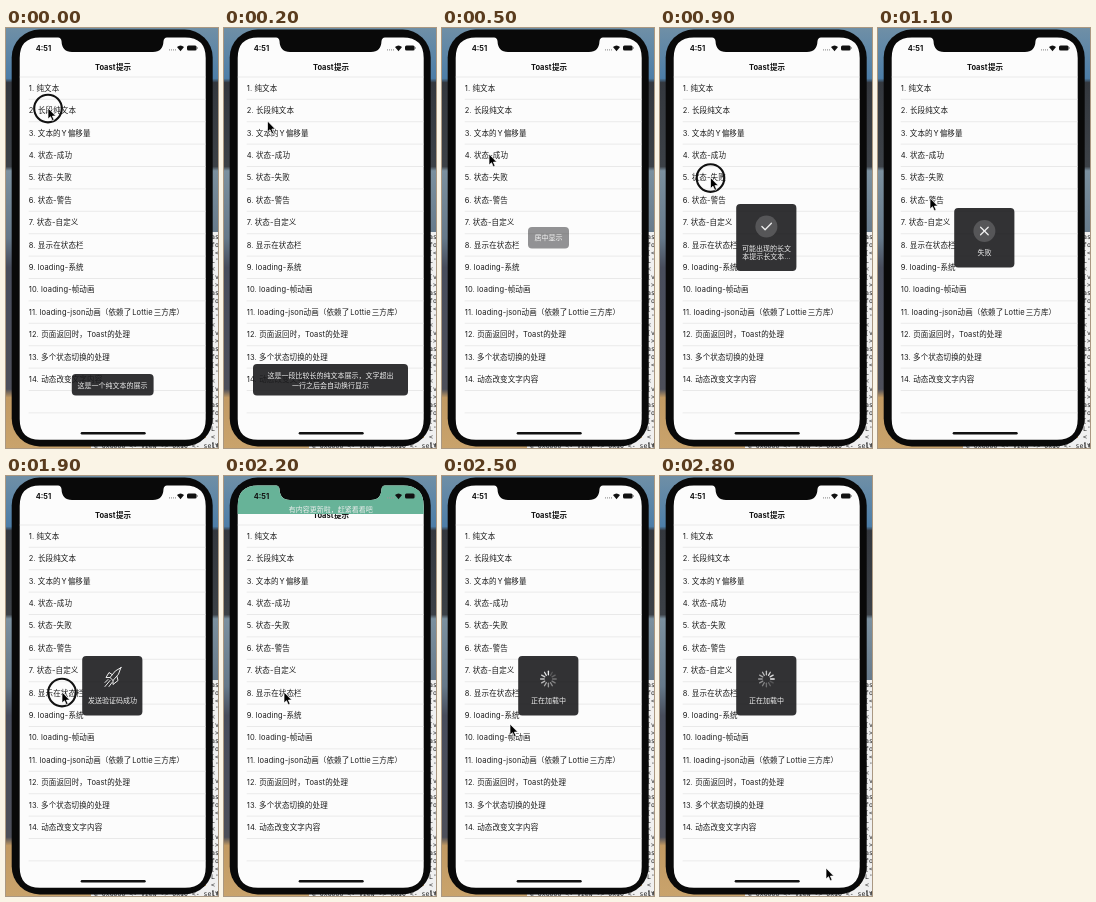
Write an HTML page that moves like this. It is 212 px wide and 420 px high and loops after 2900 ms.

```html
<!DOCTYPE html>
<html lang="zh">
<head>
<meta charset="utf-8">
<style>
html, body { margin: 0; width: 100%; height: 100%; overflow: hidden; background: #101010; }
svg { display: block; width: 212px; height: 420px; font: 7.5px Inter, "Noto Sans CJK SC", "Noto Sans CJK", sans-serif; }
.list text { letter-spacing: .14px; fill: #1c1c1c; }
.bold { font-size: 7.5px; font-weight: 700; fill: #111; }
.toast text { font-size: 7px; fill: #eee; text-anchor: middle; }
.term text { font: 6.5px "DejaVu Sans Mono", monospace; fill: #222; }
.icon { fill: none; stroke: #eee; stroke-width: 1.3; stroke-linecap: round; stroke-linejoin: round; }
</style>
</head>
<body>
<svg viewBox="0 0 212 420">
  <defs>
    <linearGradient id="wall" x2="0" y2="1">
      <stop offset="0" stop-color="#6f8fa6"/><stop offset=".12" stop-color="#4d7ea8"/>
      <stop offset=".13" stop-color="#34383e"/><stop offset=".33" stop-color="#3c4147"/>
      <stop offset=".34" stop-color="#7b909f"/><stop offset=".5" stop-color="#66798a"/>
      <stop offset=".57" stop-color="#484d5c"/><stop offset=".86" stop-color="#4d4f5a"/>
      <stop offset=".88" stop-color="#c29a63"/><stop offset="1" stop-color="#c9a36c"/>
    </linearGradient>
    <clipPath id="screen"><path d="M34 9.5H52Q55 9.5 55.5 13Q56 24 66 24H147Q157 24 157.5 13Q158 9.5 161 9.5H179Q199.7 9.5 199.7 30V391Q199.7 411.7 179 411.7H34Q13.7 411.7 13.7 391V30Q13.7 9.5 34 9.5Z"/></clipPath>
  </defs>
  <rect width="212" height="420" fill="url(#wall)"/>
  <g class="term" id="term">
    <path d="M200 204H212V420H85V410H200Z" fill="#f0f0f0"/>
  </g>
  <rect x="5.7" y="1.5" width="201" height="417" rx="28" fill="#090909"/>
  <g clip-path="url(#screen)">
    <rect width="212" height="420" fill="#fcfcfc"/>
    <path id="lines" stroke="#dedede" stroke-width=".6"/>
    <text class="bold" x="107" y="41.8" text-anchor="middle">Toast&#x200a;提示</text>
    <g class="list" id="list"></g>
    <rect x="74.7" y="404" width="65" height="2.4" rx="1.2" fill="#111"/>
    <g class="toast" id="banner">
      <rect x="13" width="187" height="38" fill="#67b398"/>
      <text x="106.7" y="36.3">有内容更新啦，赶紧看看吧</text>
    </g>
    <text class="bold" x="29.7" y="22.8">4:51</text>
    <path d="M163 21.8h1m1 0h1m1 0h1m1 0h1" stroke="#999" stroke-width="1.2"/>
    <path d="M171 19Q174.5 15.8 178 19L174.5 23.2Z" fill="#111"/>
    <rect x="181" y="17.4" width="9.6" height="5.2" rx="1.5" fill="#111"/>
    <path d="M191.4 19v2" stroke="#888" stroke-width=".8"/>
  </g>
  <g class="toast" id="toast"></g>
  <g id="pointer">
    <circle id="ring" cy=".6" r="13.8" fill="none" stroke="#111" stroke-width="2.1"/>
    <path d="M0 0V11L2.5 8.7L4.3 12.8L6.1 12L4.4 8.1H7.8Z" fill="#000" stroke="#fff" stroke-width=".7"/>
  </g>
</svg>
<script>
const $ = id => document.getElementById(id);
const STEP = 100, LOOP = 2900;

const rows = ['纯文本', '长段纯文本', '文本的\u200aY\u200a偏移量', '状态-成功', '状态-失败', '状态-警告', '状态-自定义',
  '显示在状态栏', 'loading-系统', 'loading-帧动画', 'loading-json动画（依赖了\u200aLottie\u200a三方库）',
  '页面返回时，Toast的处理', '多个状态切换的处理', '动态改变文字内容'];
$('list').innerHTML = rows.map((row, i) =>
  `<text x="22.7" y="${62.8 + 22.4 * i}">${i + 1}. ${row}</text>`).join('');
$('lines').setAttribute('d', 'M13 49H200' +
  Array.from({ length: 15 }, (_, i) => `M22.7 ${71.3 + 22.4 * i}H200`).join(''));
const words = ['as', 'fo', '[&lt;', 'L\'', '&lt;', '[v', '-&gt;'];
$('term').innerHTML += Array.from({ length: 27 }, (_, i) =>
  `<text x="205" y="${211 + i * 8}">${words[i % words.length]}</text>`).join('') +
  '<text x="88" y="419.5">e 0x6000 &lt;- view -&gt; 0x10 &lt;- self</text>';

const box = (x, y, w, h) => `<rect x="${x}" y="${y}" width="${w}" height="${h}" rx="4" fill="#1c1c1e" fill-opacity=".9"/>`;
const label = (text, y) => `<text x="106.4" y="${y}">${text}</text>`;
const card = (icon, text) => box(76.2, 180, 60.2, 59.6) + icon + label(text, 227.4);
const badge = (path, y = 203) =>
  `<g transform="translate(106.4 ${y})"><circle r="11" fill="#565658"/><path class="icon" d="${path}"/></g>`;
const spinner = step => Array.from({ length: 12 }, (_, i) =>
  `<path class="icon" d="M0 -4.2V-7.8" opacity="${.2 + .8 * ((i - step + 36) % 12) / 11}"
    transform="translate(106.4 203) rotate(${i * 30})"/>`).join('');
const rocket = `<path class="icon" style="stroke-width:1" transform="translate(107 201.5)"
  d="M8 -10Q2 -8 -3 0L0 3Q7 -3 8 -10ZM-1 -3L-4 -5L-7 0L-3 0M4 -1L5 3L0 7L0 3M-3 3L-8 9M-5 2L-8 5M-1 5L-4 9"/>`;

// First step in which each toast shows
const toasts = [
  [0, () => box(65.8, 346, 81.8, 21.5) + label('这是一个纯文本的展示', 359.6)],
  [1, () => box(29, 336, 155, 31.5) + label('这是一段比较长的纯文本展示，文字超出', 349.5) + label('一行之后会自动换行显示', 359.5)],
  [4, () => box(86, 199, 41, 21.5) + label('居中显示', 212.4)],
  [6, () => ''],
  [7, () => box(76.2, 176, 60.2, 67) + badge('M-4.5 0L-1.3 3.3L5 -3.2', 198.5) + label('可能出现的长文', 222.5) + label('本提示长文本…', 231)],
  [10, () => card(badge('M-3.8 -3.8L3.8 3.8M3.8 -3.8L-3.8 3.8'), '失败')],
  [13, () => card(badge('M-4 -3v.2M4 -3v.2M-4.5 5Q0 -1 4.5 5'), '警告')],
  [16, () => card(rocket, '发送验证码成功')],
  [20, () => ''],
  [25, step => card(spinner(step), '正在加载中')]
];

const path = [[0, 42, 80], [1, 42, 82], [3, 45, 104], [5, 47, 126], [6, 47, 127], [8, 50, 146], [9, 50.5, 149.5],
  [11, 52, 170], [12, 52, 172], [14, 54, 191], [15, 54, 193], [18, 56, 214], [19, 56, 216],
  [22, 60, 216], [24, 62, 238], [25, 68, 248], [28, 166, 392]];
const clicks = [0, 3, 6, 9, 12, 15, 19, 24];

function pointerAt(step) {
  const i = Math.max(1, path.findIndex(p => p[0] >= step));
  const [a, x0, y0] = path[i - 1], [b, x1, y1] = path[i];
  const k = (step - a) / (b - a);
  return [x0 + (x1 - x0) * k, y0 + (y1 - y0) * k];
}

let shown = -1;
function draw(now) {
  const step = Math.floor(now % LOOP / STEP);
  if (step !== shown) {
    shown = step;
    $('toast').innerHTML = toasts.filter(t => t[0] <= step).pop()[1](step);
    $('toast').setAttribute('opacity', step === 5 ? .52 : 1);
    const slide = step < 20 || step > 24 ? -40 : step === 20 || step === 24 ? -18 : 0;
    $('banner').setAttribute('transform', `translate(0 ${slide})`);
    $('pointer').setAttribute('transform', `translate(${pointerAt(step)})`);
    $('ring').setAttribute('visibility', clicks.includes(step) ? 'visible' : 'hidden');
  }
  requestAnimationFrame(() => draw(performance.now() - start));
}
const start = performance.now();
draw(0);
</script>
</body>
</html>
```
